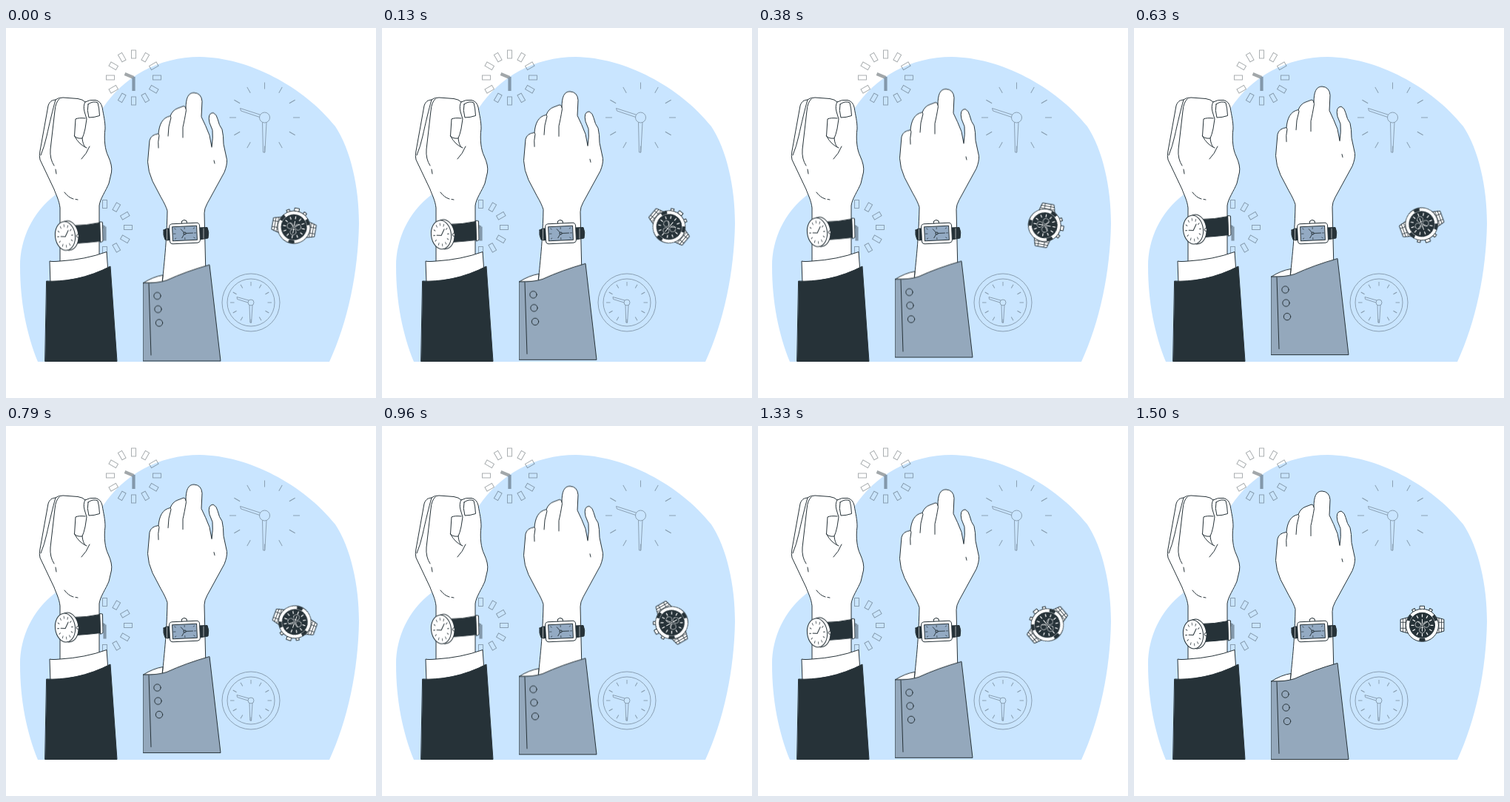
An HTML page for the animation above (1.54 s loop, 500x500 px).

```html
<!DOCTYPE html>
<html lang="en">
<head>
<meta charset="utf-8">
<title>Watches</title>
<style>
  html, body { margin: 0; width: 100%; height: 100%; overflow: hidden; background: #fff; }
  svg { display: block; width: 100vw; height: 100vh; }
  .ink { stroke: #263238; stroke-width: 1; stroke-linecap: round; stroke-linejoin: round; fill: none; }
  .w { fill: #fff; }
  .d { fill: #263238; }
  .faint { stroke: #263238; stroke-width: .9; fill: none; opacity: .43; }
  .lift { animation: lift 1540ms infinite; }
  .spin { transform-origin: 389.5px 267px; animation: spin 1540ms infinite; }
  /* 24 fps: 36 held poses, the last one kept for an extra frame */
  @keyframes lift {
    0% { transform: translateY(-.556px); animation-timing-function: steps(18); }
    48.648% { transform: translateY(-10.556px); }
    48.649% { transform: translateY(-9.444px); animation-timing-function: steps(18); }
    97.297% { transform: translateY(.556px); }
    97.298%, 100% { transform: none; }
  }
  @keyframes spin {
    0% { transform: rotate(10deg); animation-timing-function: steps(36); }
    97.297% { transform: rotate(370deg); }
    97.298%, 100% { transform: rotate(360deg); }
  }
</style>
</head>
<body>
<svg viewBox="0 0 500 500">
  <defs>
    <g id="blockClock">
      <g class="ring"><rect x="-3" y="-37" width="6" height="11"/></g>
      <path d="M0 -1V18M0 0L-12 -5" stroke-width="4.2"/>
    </g>
  </defs>

  <path fill="#c9e5ff" d="M43 451C28 414 19 370 19 322C19 285 36 249 66 226C106 198 106 145 131 108C159 66 206 39 262 39C328 40 402 79 445 133C466 165 477 215 477 264C476 330 462 397 437 451Z"/>

  <g class="faint">
    <use href="#blockClock" x="172.5" y="67"/>
    <use href="#blockClock" x="133.5" y="269.5"/>
    <g transform="translate(349.5 121)">
      <g class="ring"><path d="M0 -47.5V-38.5"/></g>
      <circle r="7"/>
      <path d="M-6 -3.8L-33 -12.500L-32 -9L-7 -.6M-3 6.400L-2 47H.3L2.500 6.400"/>
    </g>
    <g transform="translate(331 371)">
      <circle r="39"/><circle r="32"/>
      <g class="ring"><path d="M0 -28V-22.5"/></g>
      <circle r="4"/>
      <path d="M-3 -3L-19 -7.5L-18.5 -4.5L-4 0M-2 3.5L-1.2 27H.6L2 3.5"/>
    </g>
  </g>

  <!-- left arm -->
  <g class="ink">
    <path class="w" d="M73 325V243C72 233 67 224 65 218L46 178Q44.500 173 46 166L57 105C59 99 62 97.500 67 97Q69 94.500 77 94L97 95.500Q104 96.500 107 100Q113 96.500 121 97.500Q128 99 130 107C132 119 134 126 134 136C132 151 134 165 138 173Q144 186 142.500 195L139 210C135 220 127 231 126 240V325Z"/>
    <path d="M67 97C63 111 59 128 55 146Q52 160 47 172M72 96Q67 100 66 112L60 164Q59 177 65 186M67 191L68 197"/>
    <path d="M107 100Q104 105 106 113L109 123L107 136Q105 145 103 149Q104 158 107 161M107 122Q98 121 94 123L92.500 146Q96 150 103 149M92.500 146Q99 158 109 162M113 160Q109 170 102 177"/>
    <path d="M111 103Q118 98 124 101Q126 108 126.500 118.500Q119 121 112 121Q109 111 111 103ZM79 222Q84 229 91 231M94 231.500L97 232"/>
    <path class="w" d="M60 345L59 315Q62 316 73 315Q107 313 136 302.500L138 330Z"/>
    <path class="d" d="M55 342Q70 343 94 339Q120 333 141 322L150 450.500H53Z"/>
  </g>

  <!-- round watch -->
  <g class="lift">
    <g class="ink" transform="translate(0 .5)">
      <path class="d" d="M90 267Q109 267 127 263L128 288Q111 290 95 291Z"/>
      <path class="w" d="M127 262L130.500 262.500L131 288L128 289.500Z"/>
      <ellipse class="w" cx="84" cy="280.500" rx="14" ry="20" transform="rotate(-7 84 281)"/>
      <circle class="w" cx="97" cy="281" r="1.800"/>
      <g transform="translate(80 281) rotate(-7)">
        <ellipse class="w" rx="13.500" ry="19.500"/>
        <g transform="scale(.68 1)"><g class="ring"><path d="M0 -15.500V-12.500"/></g></g>
        <path d="M5 -7L0 1L-6 0"/>
      </g>
    </g>
  </g>

  <!-- right arm -->
  <g class="lift">
    <g class="ink" transform="translate(0 .5)">
      <path class="w" d="M211 350C212 328 217 300 218 247Q216 240 209 228L198 207Q192 194 191.500 181L194 152Q196 144 206 143C207 131 211 121 222 119Q225 111 232 108.500L240 105.500Q243 106 243 109C243 95 246 87.500 254 87.500Q264 88 265 99L264 120Q270 132 275 145L278 161Q280 148 279 138L275 128Q272 115 280 114.500Q285 117 286 123Q288 132 292 137Q294 145 294 157L298.500 178Q299 185 295 195L272 237Q268 244 268 250L270 335Z"/>
      <path d="M206 143L207 145Q205 154 206 162M222 119L223 121Q219 133 219 146M243 109L243.500 111Q241 126 239 134V148M281 179L282 183"/>
      <path class="w" d="M185.500 344.500Q199 336 212 334L211 344Z"/>
      <path fill="#94a8bc" d="M185.500 344.500Q205 345 217 341Q243 329 275 320L290 450H185.500Z"/>
      <path d="M193 345.500L196 442"/>
      <circle cx="204.500" cy="362" r="4.700"/><circle cx="205.500" cy="380" r="4.700"/><circle cx="207" cy="398.500" r="4.700"/>
    </g>
  </g>

  <!-- square watch -->
  <g class="ink">
    <path class="d" d="M213 273Q217 270 223 271V286Q218 288 215 286Q212 280 213 273ZM260 270L272 269.500Q275 276 273 284L261 286Z"/>
    <path stroke="#fff" stroke-width=".6" d="M217.500 272V286M267 271V284"/>
    <g transform="translate(241.500 277.500) rotate(-2.500)">
      <path class="w" d="M-3.500 -13V-16Q0 -20 3.500 -16V-13Z"/>
      <rect class="w" x="-20.500" y="-13.500" width="41" height="27" rx="4"/>
      <rect fill="#93aac3" x="-16.500" y="-9.500" width="33" height="19"/>
      <path d="M11 0H0L-5 -6M0 0L-4 6" stroke-width=".9"/>
      <path stroke-width=".7" d="M0 -8V-6M0 6V8M-15 0H-12.500M13 0H15M-13.500 -7L-12 -6M13.500 -7L12 -6M-13.500 7L-12 6M13.500 7L12 6"/>
      <circle r="1.600" fill="#93aac3"/>
    </g>
  </g>

  <!-- chronograph -->
  <g class="spin">
    <g class="ink" transform="translate(389.500 269.300)">
      <path class="w" d="M-29 -8L-18 -11V11L-29 8ZM29 -8L18 -11V11L29 8Z"/>
      <path stroke-width=".8" d="M-26 -9V9M-22.500 -9.500V9.500M26 -9V9M22.500 -9.500V9.500M-29 -4H-18M-29 4H-18M18 -4H29M18 4H29"/>
      <rect class="w" x="-3" y="-26" width="6" height="5"/>
      <g id="push"><rect class="w" x="-2" y="-25" width="4" height="4" transform="rotate(-29)"/></g>
      <use href="#push" transform="scale(-1 1)"/>
      <circle class="w" r="22"/>
      <g stroke-width="4" stroke-linecap="butt">
        <path id="block" d="M-4 19.400Q0 20.200 4 19.400"/>
        <use href="#block" transform="rotate(120)"/><use href="#block" transform="rotate(240)"/>
      </g>
      <circle class="d" r="17"/>
      <g stroke="#fff" stroke-width=".6">
        <g class="ring"><path d="M0 -14.500V-11.500" stroke-width="1.200"/></g>
        <circle cx="-5.500" cy="-1" r="4"/><circle cx="5.500" cy="-1" r="4"/><circle cy="6.500" r="4"/>
        <path d="M0 0L-6 -5M0 0L7 -5M0 -8V8" stroke-width=".9"/>
      </g>
      <circle class="w" r="1.200"/>
    </g>
  </g>
</svg>
<script>
  // repeat each dial mark around the clock
  for (const ring of document.querySelectorAll('.ring')) {
    const mark = ring.firstElementChild;
    for (let i = 1; i < 12; i++) {
      const copy = mark.cloneNode();
      copy.setAttribute('transform', `rotate(${i * 30})`);
      ring.append(copy);
    }
  }
</script>
</body>
</html>
```
